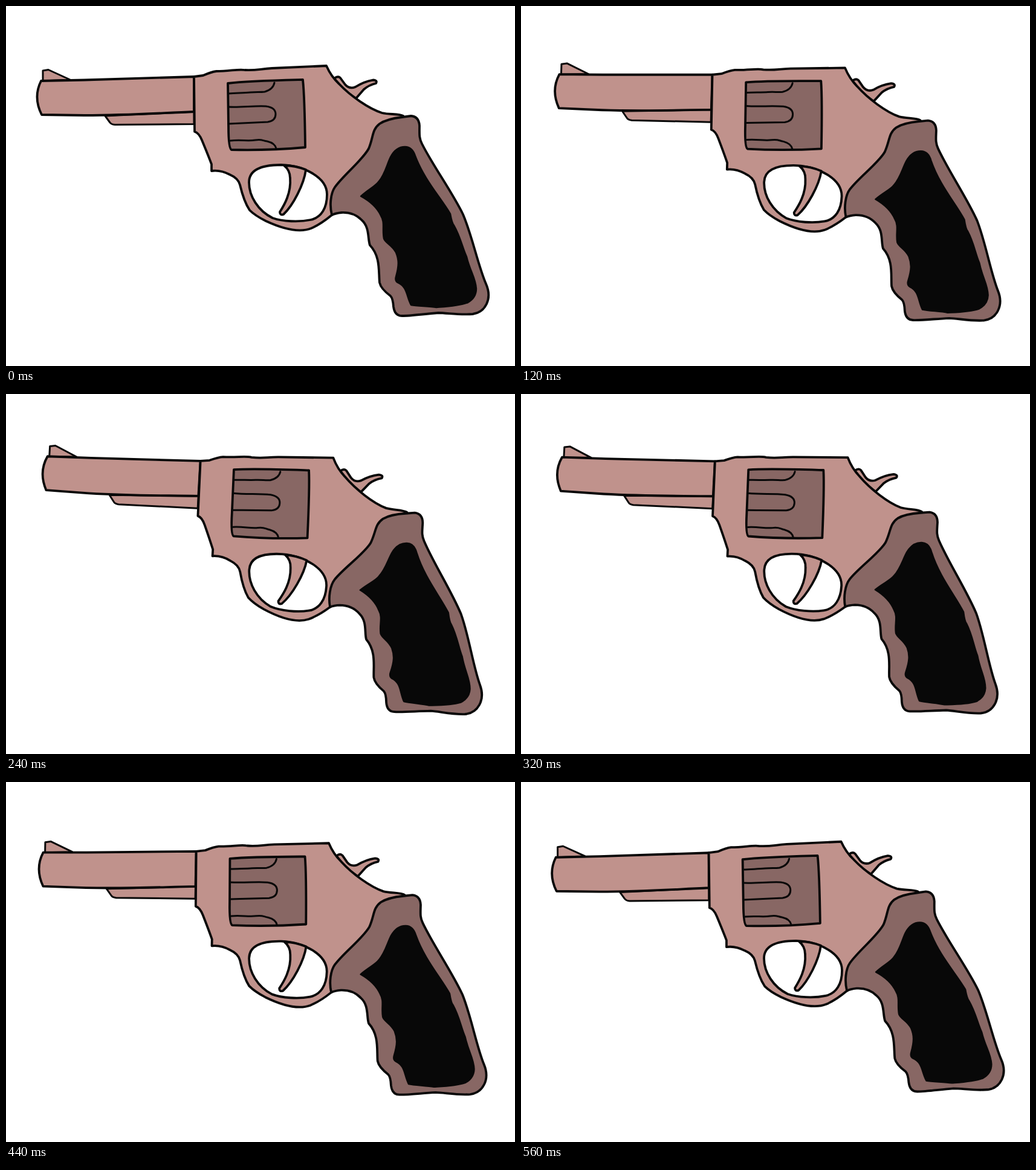
An HTML page that plays this animation: 842 px wide and 596 px high, repeating every 0.6 s.

```html
<!DOCTYPE html>
<html lang="en">
<head>
<meta charset="utf-8">
<title>Swinging revolver</title>
<style>
  html, body { margin: 0; width: 100%; height: 100%; overflow: hidden; background: #fff; }
  svg { display: block; width: 842px; height: 596px; }
  path { stroke: #080808; stroke-width: 3.8; stroke-linejoin: round; stroke-linecap: round; }
  .body { fill: #c0928c; }
  .dark { fill: #886764; }
  .thin { stroke-width: 3; }
  .line { fill: none; stroke-width: 3; }
  .hole { fill: #fff; }
  .inlay { fill: #080808; stroke-width: 2.4; }
</style>
</head>
<body>
<svg viewBox="0 0 842 596">
  <g id="gun">
    <!-- hammer -->
    <path class="body" d="M543 120Q549 115 553 119L561 130Q568 138 578 134Q592 125 607 122.5Q615 123 612 128Q600 131 592 138L579 153L560 140Z"/>
    <!-- sight, ejector shroud, barrel -->
    <path class="body thin" d="M61 124V107L70 105.5L106 122Z"/>
    <path class="body thin" d="M164 182L172 193Q174 196 180 196.5L311 195.5V175Z"/>
    <path class="body" d="M58 124L130 122.5L311 117V175C240 178 200 181 130 181L59 180C49 160 49 142 58 124Z"/>
    <!-- frame -->
    <path class="body" d="M311 117L326 115Q340 109 348 108C370 108 385 104 395 106C415 107 420 104 440 103L530 99Q538 117 551 129C570 149 600 170 622 177C635 180 650 178 657 182L600 290L539 346Q521 361 505 368C485 376 458 369 430 356Q412 347 403 338C395 326 391 313 387 296Q384 285 370 279Q355 271 340 273V262C334 246 329 234 324 222Q319 210 312 208Z"/>
    <!-- trigger guard and trigger -->
    <path class="hole" d="M402 292C402 270 425 263 455 263C492 264 531 283 531 312C531 334 522 350 504 354C485 358 458 357 441 351C417 339 402 315 402 292Z"/>
    <path class="body" d="M460 264Q470 272 470 285C472 310 460 330 453 341Q453 347 459 345C475 330 493 295 496 271Q478 264 460 264Z"/>
    <!-- cylinder -->
    <path class="dark" d="M367 128C400 124 450 123 491 122Q494 150 495 234C450 238 410 239 373 238Q368 236 368 200Z"/>
    <path class="line" d="M368 145C382 144 394 144 404 143S420 143 428 142Q442 138 444 127M368 167C390 168 410 165 430 166Q446 168 446 179Q446 190 433 192C410 193 390 194 369 195M371 223C388 221 400 224 412 222S424 223 432 224Q445 227 447 236"/>
    <!-- grip -->
    <path class="dark" d="M655 184L670 182Q683 183 684 198C684 212 683 218 688 228C706 264 738 308 756 345C771 380 781 430 794 460C805 485 793 507 772 510C750 512 730 508 715 508C690 510 670 513 655 513Q643 513 641 498Q640 484 636 480Q620 468 618 458C616 440 620 415 602 396C598 385 602 366 588 354Q575 341 555 342Q545 343 539 346C535 330 537 310 544 300C558 280 590 255 600 236C608 217 605 205 618 195Q630 187 655 184Z"/>
    <path class="inlay" d="M587 315C600 303 612 298 617 290C627 278 630 262 636 250Q645 233 660 233Q672 233 677 248C692 288 720 318 735 344C737 355 738 360 741 363C752 382 755 400 762 415C768 440 777 450 778 468Q778 483 764 491C748 497 725 498 712 499C700 497 680 497 670 495C662 480 664 465 648 458Q643 455 645 448C650 430 650 420 645 408C638 395 628 393 625 385C622 370 627 358 620 347C613 332 600 322 587 315Z"/>
  </g>
</svg>
<script>
  const LOOP = 600, STEP = 40, SWING = 3.5, PEAK = 264, REST = 0.035;
  const gun = document.getElementById('gun');
  const start = performance.now();

  // Sine swing about the stage centre, held for each step.
  function angleAt(ms) {
    const t = Math.floor((ms % LOOP) / STEP) * STEP;
    const lift = (1 + Math.cos(2 * Math.PI * (t - PEAK) / LOOP)) / 2;
    return SWING * (lift - REST);
  }

  function draw() {
    const angle = angleAt(performance.now() - start);
    gun.setAttribute('transform', `rotate(${angle} 421 298)`);
    requestAnimationFrame(draw);
  }
  draw();
</script>
</body>
</html>
```
